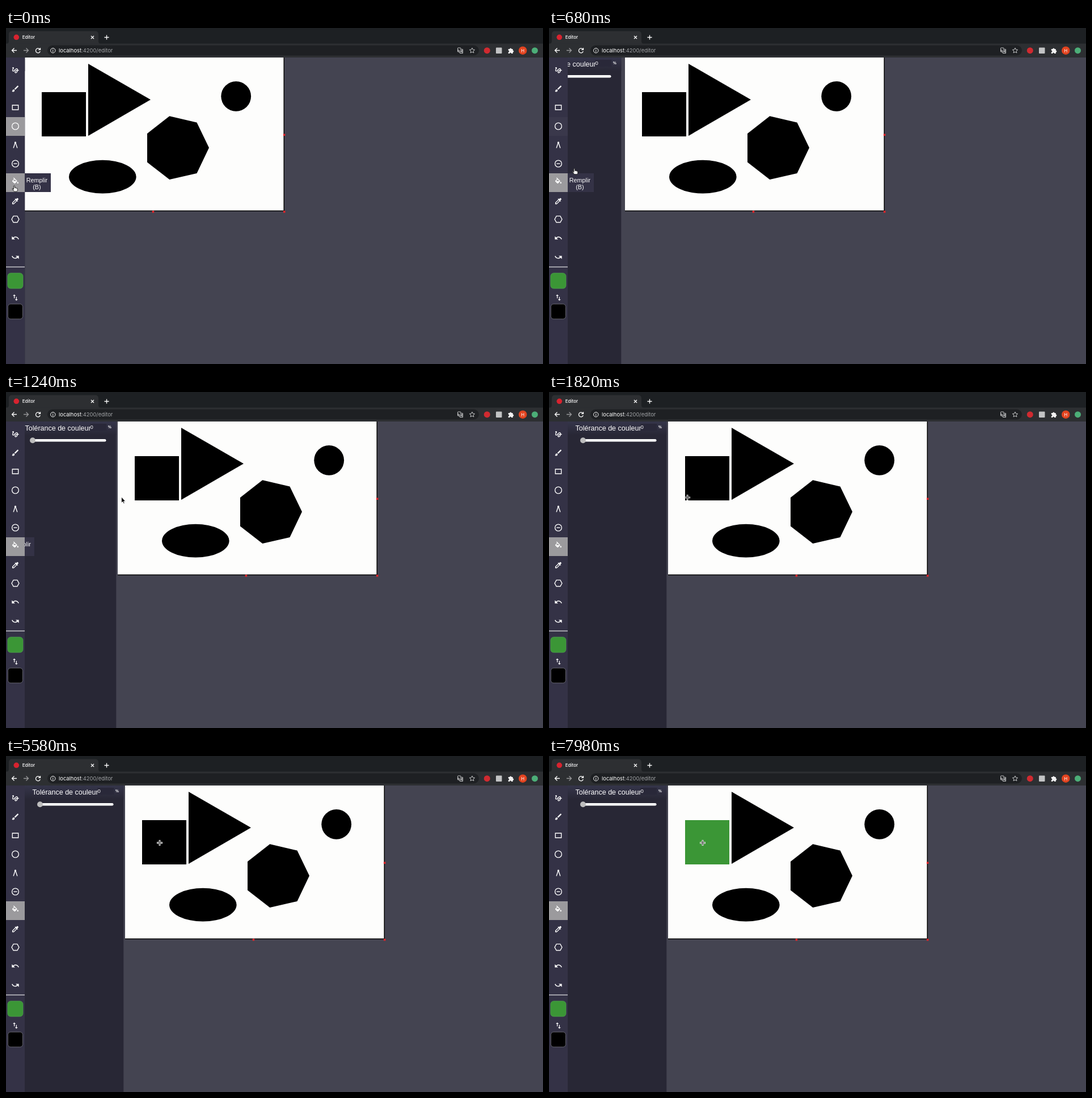
An HTML page that plays this animation: 947 px wide and 592 px high, repeating every 8000 ms.

```html
<!DOCTYPE html>
<html lang="fr">
<head>
<meta charset="utf-8">
<title>Editor</title>
<style>
  html, body { margin: 0; width: 100%; height: 100%; overflow: hidden; background: #444451; }
  svg { display: block; width: 947px; height: 592px; }
  text { fill: #fff; white-space: pre; }
  .ui { font-family: Inter, Roboto, sans-serif; }
  .page { font-family: "Liberation Sans", Arial, sans-serif; }
  .line { fill: none; stroke: #fff; stroke-width: 1.3; }
  .icon { fill: #fff; }
  .icon .line { stroke-width: 2.2; }
</style>
</head>
<body>
<svg viewBox="0 0 947 592">
  <rect width="947" height="592" fill="#444451"/>

  <g id="canvas">
    <rect x="33" y="52" width="458" height="271"/>
    <rect x="33" y="52" width="456.5" height="269.5" fill="#fdfdfc"/>
    <rect id="square" x="63" y="113" width="78" height="78"/>
    <path d="M145 63L255 126.3 145 190z"/>
    <circle cx="405.7" cy="120.3" r="26.4"/>
    <path d="M249 186L288.3 155.3 336.5 166.5 358 211 336.5 256 288.3 267 249 236.5z"/>
    <ellipse cx="170.3" cy="262.2" rx="59.3" ry="29.4"/>
    <g fill="#e3262b">
      <rect x="489" y="186.5" width="3.5" height="3.5"/>
      <rect x="489" y="322" width="3.5" height="3.5"/>
      <rect x="257.7" y="322" width="3.5" height="3.5"/>
    </g>
  </g>

  <g id="panel" class="page">
    <defs>
      <linearGradient id="shade" x2="0" y2="1">
        <stop stop-color="#35354a"/><stop offset="1" stop-color="#282735"/>
      </linearGradient>
    </defs>
    <rect x="33" y="52" width="174.3" height="540" fill="#282735"/>
    <rect x="33" y="52" width="174.3" height="24" fill="url(#shade)"/>
    <text x="46.5" y="67.8" font-size="12.5">Tolérance de couleur</text>
    <rect x="161.3" y="56" width="29" height="12" fill="#292839"/>
    <text x="161.5" y="65.3" font-size="9.5">0</text>
    <text x="193" y="64" font-size="6.5" font-weight="bold">%</text>
    <rect x="60" y="83" width="129.5" height="4.6" rx="2.3" fill="#fff"/>
    <circle cx="60" cy="85.3" r="5" fill="#bdbdbd"/>
  </g>

  <g id="tip" class="page" font-size="10.8" text-anchor="middle">
    <rect x="33" y="256" width="46" height="33" fill="#343246"/>
    <text x="54.4" y="271.7">Remplir</text>
    <text x="54.4" y="283.7">(B)</text>
  </g>

  <g id="sidebar">
    <rect y="52" width="33" height="540" fill="#343246"/>
    <rect id="previous" y="157" width="33" height="33" fill="#9b9a9d"/>
    <rect y="256" width="33" height="33" fill="#9b9a9d"/>
    <g id="tools"></g>
    <rect y="420.4" width="33" height="1.2" fill="#e8e8ea"/>
    <rect x="2.8" y="431.8" width="27.2" height="27.2" rx="5.5" fill="#3b9636" stroke="#55a855" stroke-width=".6"/>
    <rect x="3.3" y="486.3" width="26.2" height="26.4" rx="5" stroke="#77777f" stroke-width=".8"/>
  </g>

  <g id="browser" class="ui">
    <rect width="947" height="28" fill="#1d2023"/>
    <path d="M0 28Q5 28 5 23V11Q5 5.500 10.500 5.500H157Q163 5.500 163 11V23Q163 28 168 28z" fill="#2d2f32"/>
    <rect y="27.500" width="947" height="24.500" fill="#2d2f32"/>
    <rect x="73" y="30.500" width="761" height="18" rx="9" fill="#1e2023"/>
    <circle cx="18.300" cy="16.300" r="4.800" fill="#d8232f"/>
    <text x="28.800" y="19.200" font-size="8" font-weight="500">Editor</text>
    <path class="line" d="M150 14l5 5m0-5l-5 5M173.500 16.500h8m-4-4v8"/>
    <path class="line" d="M19 39.500h-8.500m4-4l-4 4 4 4"/>
    <path class="line" d="M31 39.500h8.500m-4-4l4 4-4 4" stroke-opacity=".5"/>
    <path class="line" d="M59.800 37.600A4 4 0 1 0 60.300 41M60.500 35v3.300h-3.300"/>
    <circle class="line" cx="82.800" cy="39.700" r="4.200" style="stroke-width:1"/>
    <path class="line" d="M82.800 39v3.200m0-5.200v1.100" style="stroke-width:1"/>
    <text x="93" y="43" font-size="9.400">localhost<tspan fill="#a3a5a8">:4200/editor</tspan></text>
    <g class="line" style="stroke-width:.9;stroke:#d6d7d9">
      <rect x="796.500" y="35" width="5.500" height="7" rx=".8"/>
      <path d="M802.500 37.500h3v7h-5l-1-2.500m-1-3.500a1.300 1.300 0 1 0 1 1h-1M802.500 40h3m-1.500-1v1q0 2-2 3m.5-2l2.500 2"/>
      <path d="M822 35l1.400 3 3.200.4-2.400 2.200.7 3.200-2.900-1.600-2.900 1.600.7-3.200-2.400-2.200 3.200-.4z"/>
    </g>
    <circle cx="848.300" cy="39.700" r="5.500" fill="#d02a30"/>
    <rect x="864" y="34.500" width="10.500" height="10.500" rx="1" fill="#c2c3c4"/>
    <path fill="#f2f2f2" d="M885.800 37h2.500a1.600 1.600 0 0 1 3.200 0h2.300v2.500a1.600 1.600 0 0 1 0 3.200v2.300h-2.600a1.500 1.500 0 0 0-3 0h-2.400v-2.600a1.500 1.500 0 0 0 0-3z"/>
    <circle cx="911.300" cy="39.700" r="7.200" fill="#e2431f"/>
    <text x="911.300" y="42.700" font-size="8" text-anchor="middle">H</text>
    <circle cx="932.500" cy="39.700" r="5.500" fill="#4cae78"/>
  </g>

  <g id="cursor">
    <path id="hand" fill="#fff" stroke="#111" stroke-width=".9" stroke-linejoin="round"
      d="M-2.500 1.500V-4q0-1.200 1-1.200t1 1.200v2.800q1.200-.7 1.700.2 1.200-.5 1.700.5 1.500-.3 1.500 1V2.500Q4.400 4 3.300 5H-1.500L-4.800 1q-.5-1.200.6-1.300z"/>
    <path id="arrow" fill="#050505" stroke="#fff" stroke-width=".8" d="M0-.5V9.800L2.300 7.700 4 11.300l1.600-.7L4 7.200h3.200z"/>
    <g id="cross" fill="none">
      <path d="M-5 0H5M0-5V5" stroke="#fff" stroke-width="2.800"/>
      <path d="M-4.300 0H4.300M0-4.300V4.300" stroke="#333" stroke-width="1.200"/>
    </g>
  </g>
</svg>

<script>
const LOOP = 8000, FILL_AT = 7540;
const $ = id => document.getElementById(id);

// Tool icons: vertical centre and artwork on a 24-unit grid.
const line = d => `<path class="line" d="${d}"/>`;
const shape = d => `<path d="${d}"/>`;
const ring = '<circle class="line" cx="12" cy="12" r="9.6"/>';
const undo = 'M12.500 8c-2.650 0-5.050 1-6.900 2.600L2 7v9h9l-3.600-3.600c1.400-1.200 3.200-1.900 5.100-1.900 3.500 0 6.500 2.300 7.600 5.500l2.400-.8C21 11 17.100 8 12.500 8z';
const tools = [
  [74, line('M3.500 7C6 4 8 5 6 8S3 15 6 15.500 11 9 15 8.500 19 13 17 17s-6 4-6 .5 5-5 11-4.500')],
  [107, shape('M7 14c-1.700 0-3 1.300-3 3 0 1.300-1.200 2-2 2 .9 1.200 2.500 2 4 2 2.200 0 4-1.800 4-4 0-1.700-1.300-3-3-3zM20.700 4.600l-1.300-1.300a1 1 0 0 0-1.400 0L9 12.250 11.750 15l9-9a1 1 0 0 0 0-1.400z')],
  [140, line('M3.500 5.500h17v13h-17z')],
  [173, ring],
  [206, line('M11.500 6L6.500 21M12.500 6l5 15') + '<circle cx="12" cy="5.500" r="2.700"/>'],
  [239, ring + line('M7 12h10')],
  [271, shape('M16.560 8.940L7.620 0 6.200 1.400l2.400 2.400-5.150 5.150a1.500 1.500 0 0 0 0 2.100l5.500 5.500a1.500 1.500 0 0 0 2.100 0l5.500-5.500a1.500 1.500 0 0 0 0-2.100zM5.200 10L10 5.200 14.800 10zM19 11.500s-2 2.200-2 3.500a2 2 0 0 0 4 0c0-1.300-2-3.500-2-3.500z')],
  [305, shape('M20.700 5.600l-2.300-2.300a1 1 0 0 0-1.400 0l-3.100 3.100L12 4.500l-1.400 1.400L12 7.300 3 16.250V21h4.750l8.900-8.900 1.400 1.400 1.400-1.400-1.900-1.900 3.100-3.100a1 1 0 0 0 0-1.500zM6.900 19L5 17.100 13 9l2 2z')],
  [337, line('M6.500 3h11l5 9-5 9h-11l-5-9z')],
  [370, shape(undo)],
  [404, `<g transform="rotate(180 12 12)">${shape(undo)}</g>`],
  [475, shape('M16 17V10h-2v7h-3l4 4 4-4zM9 3L5 7h3v7h2V7h3z')]
];
$('tools').innerHTML = tools.map(([y, art]) =>
  `<g class="icon" transform="translate(9.1 ${y - 7.4}) scale(.615)">${art}</g>`).join('');

// Rows are [time, value, ...]; values move linearly between rows.
const drawer = [[362, -174, 0], [450, -148, 28], [560, -114, 64], [680, -80, 101],
  [800, -53, 126], [950, -32, 146], [1240, -13, 164], [1500, -4, 173], [1700, 0, 177]];
const pointer = [[400, 16, 283], [520, 22, 276], [680, 46, 253], [860, 105, 217], [1060, 172, 191],
  [1240, 203.500, 185.500], [1500, 230, 186], [1820, 244, 186], [2050, 260, 168],
  [2350, 271, 152.500], [5020, 271, 152.500], [5060, 271, 153]];
const tooltip = [[760, 0], [1000, -10], [1240, -29], [1480, -46]];
const highlight = [[362, 1], [680, .06], [760, 0]];

function at(rows, t) {
  const next = rows.findIndex(row => row[0] > t);
  if (next === 0) return rows[0].slice(1);
  if (next < 0) return rows[rows.length - 1].slice(1);
  const a = rows[next - 1], b = rows[next];
  const k = (t - a[0]) / (b[0] - a[0]);
  return a.slice(1).map((v, i) => v + (b[i + 1] - v) * k);
}
const move = (id, x, y = 0) => $(id).setAttribute('transform', `translate(${x} ${y})`);

function draw(t) {
  const [panelX, canvasX] = at(drawer, t).map(Math.round);
  move('panel', panelX);
  move('canvas', canvasX);
  move('tip', at(tooltip, t)[0]);
  move('cursor', ...at(pointer, t));
  $('previous').style.opacity = at(highlight, t)[0];
  $('square').setAttribute('fill', t < FILL_AT ? '#000' : '#3b9636');
  const kind = t < 780 ? 'hand' : t < 1340 ? 'arrow' : 'cross';
  for (const id of ['hand', 'arrow', 'cross']) $(id).style.display = id === kind ? '' : 'none';
}

const start = performance.now();
function tick() {
  draw((performance.now() - start) % LOOP);
  requestAnimationFrame(tick);
}
tick();
</script>
</body>
</html>
```
